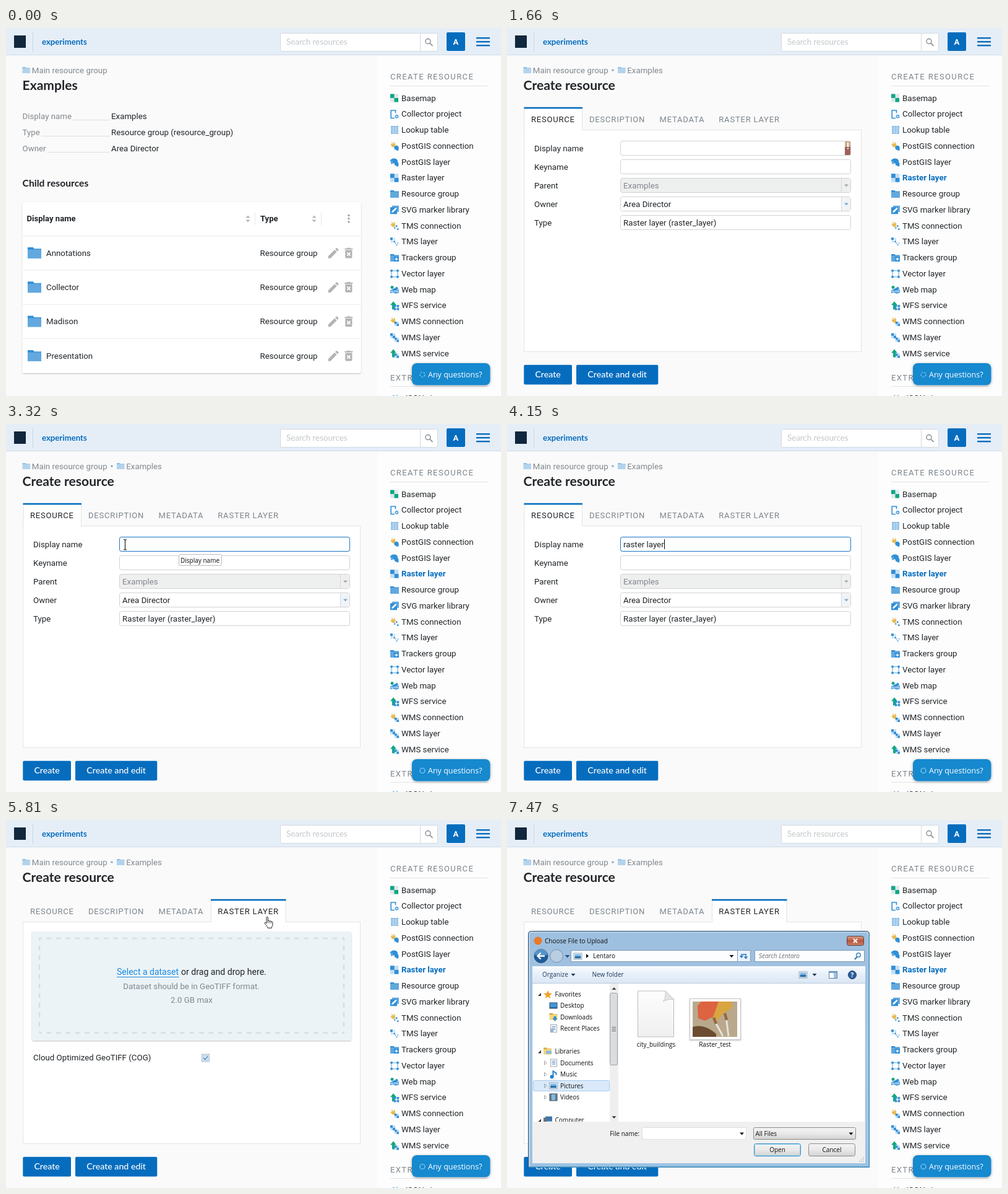
Animation, 800 px wide and 594 px high, one loop 8000 ms. Source, as an HTML page:

```html
<!DOCTYPE html>
<html lang="en">
<head>
<meta charset="utf-8">
<title>Create a raster layer</title>
<style>
html, body { margin: 0; width: 100%; height: 100%; overflow: hidden; background: #fafafa; }
svg { display: block; width: 100%; height: 100%; }
text { font: 13.3px Roboto, sans-serif; fill: #212529; white-space: pre; }
.gray { fill: #82888e; }
.bold { font-weight: 700; font-size: 13.1px; }
.lato { font-family: Lato, sans-serif; }
.h1 { font: 700 21.1px Lato, sans-serif; }
.h2 { font: 700 15.7px Lato, sans-serif; }
.caps { font-size: 13px; letter-spacing: 1.4px; fill: #7d858c; }
.tab { font-size: 13.1px; letter-spacing: .75px; fill: #7d858c; }
.tab.on { fill: #212529; }
.btn { font: 500 14.2px Lato, sans-serif; fill: #fff; }
.ui { font: 10px "Open Sans", sans-serif; fill: #111; }
.chat { font: 12.5px "Open Sans", sans-serif; fill: #fff; }
.mid { text-anchor: middle; }
</style>
</head>
<body>
<svg id="stage" viewBox="0 0 800 594" preserveAspectRatio="none" xmlns="http://www.w3.org/2000/svg"></svg>
<script>
const BLUE = '#066dbe', SKY = '#62a8de', MID = '#2f8fd8', PALE = '#c3def4', GREEN = '#12a683', YELLOW = '#e6bb55';

const T = (x, y, s, cls = '', more = '') => `<text x="${x}" y="${y}" class="${cls}" ${more}>${s}</text>`;
const R = (x, y, w, h, fill, more = '') => `<rect x="${x}" y="${y}" width="${w}" height="${h}" fill="${fill}" ${more}/>`;
const P = (d, fill, more = '') => `<path d="${d}" fill="${fill}" ${more}/>`;
const L = (d, color, w = 1, more = '') => P(d, 'none', `stroke="${color}" stroke-width="${w}" ${more}`);
const C = (x, y, r, fill, more = '') => `<circle cx="${x}" cy="${y}" r="${r}" fill="${fill}" ${more}/>`;
const G = (x, y, s, more = '') => `<g transform="translate(${x} ${y})" ${more}>${s}</g>`;
const box = (x, y, w, h, fill, stroke, r = 0) => R(x + .5, y + .5, w - 1, h - 1, fill, `rx="${r}" stroke="${stroke}"`);
const show = (id, s) => `<g id="${id}">${s}</g>`;

// ---- small icons, drawn in a 14 px square ----
const folder = (w, h, back, front) =>
  P(`M0 0H${w * .4}L${w * .48} ${h * .13}H${w}V${h * .3}H0Z`, back) + R(0, h * .2, w, h * .8, front);
const checker = (s, a, b) => R(0, 0, 2 * s, 2 * s, b) + R(0, 0, s, s, a) + R(s, s, s, s, a);
const plug = L('M2.5 .5L4 4M6.5 .5L6 3.5M5 7L7.5 10', YELLOW, 1.3) + P('M.5 4L8 2.5L8.3 5.5Q7.5 8.5 5 8.5Q2 8.5 .5 4Z', YELLOW);
const arrow = P('M0 6L5 0L10 6H7V13H3V6Z', GREEN);
const dots = R(9, 6, 2.5, 2.5, MID) + R(6, 9, 2.5, 2.5, SKY) + R(11, 11, 2.5, 2.5, MID);
const blob = (x, y, r) => C(x, y, r, MID) + R(x, y, r, r + 1, MID);
const small = G(7, 7, checker(3.5, MID, PALE));
const nodes = (a, b) => L(`M${a} ${a}H${b}V${b}H${a}Z`, SKY) +
  [[a, a], [b, a], [a, b], [b, b]].map(p => R(p[0] - 1.7, p[1] - 1.7, 3.4, 3.4, MID)).join('');
const dir = folder(14, 12, MID, SKY);

const items = [
  ['Basemap', checker(6.5, GREEN, '#dce9ee')],
  ['Collector project', L('M8.5 5V.8H1.2V13.2H7', MID, 1.6) + C(10.5, 10.5, 3, SKY) + C(10.5, 10.5, 1, '#fff')],
  ['Lookup table', R(1, 0, 12, 13, '#8bbde6') + L('M1 3.5H13M1 6.7H13M1 10H13M5 0V13M9 0V13', '#d6e8f6', .8)],
  ['PostGIS connection', plug + blob(10, 9.5, 3.5)],
  ['PostGIS layer', `<ellipse cx="6" cy="5" rx="6" ry="4" fill="${MID}"/>` + R(1, 5, 3, 5, SKY) + blob(10, 9.5, 3.3)],
  ['Raster layer', checker(6.7, MID, PALE)],
  ['Resource group', G(0, 1, dir)],
  ['SVG marker library', R(3, 0, 11, 10, SKY) + R(0, 2.5, 11, 11, MID) + P('M2 11.5L3 8.5L9 3L10.5 5L5 10.5Z', '#fff')],
  ['TMS connection', plug + dots],
  ['TMS layer', R(0, 0, 4, 4, MID) + R(5, 1, 3, 3, PALE) + R(1, 5, 3, 3, PALE) + R(5, 5, 3, 3, SKY) + P('M7 8H14L10.5 14Z', '#8bbde6') + C(10.5, 9.5, 1.5, '#fff')],
  ['Trackers group', G(0, 1, dir) + R(6, 5, 8, 8, MID) + L('M10 6.5V11.5M7.5 9H12.5', '#fff', 1.3)],
  ['Vector layer', nodes(2, 12)],
  ['Web map', P('M0 8L4 6L9 8L14 6V12L9 13.5L4 11.5L0 13Z', SKY) + P('M3 7L11 2L13 5L6 11Z', MID) + C(3, 3, 2.5, GREEN) + L('M1 10L8 9L13 10', '#e8f2fb')],
  ['WFS service', arrow + G(6, 6, nodes(1.5, 6.5))],
  ['WMS connection', plug + small],
  ['WMS layer', checker(4, MID, PALE) + small],
  ['WMS service', arrow + small]
];

// ---- page frame ----
function header() {
  return R(0, 0, 800, 43, '#e5eef7') + R(0, 43, 800, 1, '#cfdbe7') +
    R(13, 12, 19, 20, '#10273d') + R(43, 7, 1, 31, '#c6d6e5') +
    T(58, 26.5, 'experiments', 'lato', `style="font-weight:700;font-size:13.2px;fill:${BLUE}"`) +
    box(443, 8, 255, 30, '#fff', '#d3d9df', 2) + R(669, 9, 1, 28, '#d3d9df') +
    T(453, 26.5, 'Search resources', 'lato', 'style="fill:#c3c7cb"') +
    C(682, 21.5, 4, 'none', 'stroke="#858b90" stroke-width="1.4"') + L('M685 24.5L689.5 29', '#858b90', 1.7) +
    R(712, 7, 30, 30, BLUE, 'rx="2"') + T(727, 26.7, 'A', 'bold mid', 'style="fill:#fff"') +
    [15, 21, 27].map(y => R(760, y, 22, 2.4, BLUE)).join('');
}

function sidebar() {
  const rows = items.map(([name, icon], i) => {
    const y = 113 + 25.75 * i;
    return G(621, y - 6.5, icon) + T(639, y + 4.6, name, '', i === 5 ? 'id="pick"' : '');
  }).join('');
  return R(600, 44, 200, 550, '#fdfdfd') + T(621, 83, 'CREATE RESOURCE', 'caps') + R(621, 93, 158, 1, '#e3e3e3') +
    rows + T(621, 569, 'EXTRA', 'caps') + R(621, 578, 158, 1, '#e3e3e3') +
    T(642, 602, 'JSON view') + T(623, 602, '{ }', '', `style="fill:${MID}"`) +
    show('bar', R(600, 229, 3, 26, BLUE));
}

const chat = () => R(656, 541, 126.5, 35.5, '#1489cf', 'rx="8" filter="url(#soft)"') +
  C(673, 559.5, 4, 'none', 'id="ring" stroke="#8fd0f5" stroke-width="1.2"') +
  T(682, 564, 'Any questions?', 'chat');

const crumb = (x, s) => G(x, 63, folder(12.5, 10, '#8fc0e6', '#b3d3ed')) + T(x + 15.3, 72.5, s, 'gray');

// ---- resource list ----
const PEN = 'M3 17.25V21h3.75L17.81 9.94l-3.75-3.75zM20.71 7.04c.39-.39.39-1.02 0-1.41l-2.34-2.34c-.39-.39-1.02-.39-1.41 0l-1.83 1.83 3.75 3.75z';
const BIN = 'M6 19c0 1.1.9 2 2 2h8c1.1 0 2-.9 2-2V7H6zm2.46-7.12l1.41-1.41L12 12.59l2.12-2.12 1.41 1.41L13.41 14l2.12 2.12-1.41 1.41L12 15.41l-2.12 2.12-1.41-1.41L10.59 14zM15.5 4l-1-1h-5l-1 1H5v2h14V4z';
const sorter = x => P(`M${x - 3.5} 306.5L${x} 302.5L${x + 3.5} 306.5ZM${x - 3.5} 309.5L${x} 313.5L${x + 3.5} 309.5Z`, '#b4b7ba');

function list() {
  const info = [['Display name', 'Examples', 108], ['Type', 'Resource group (resource_group)', 57], ['Owner', 'Area Director', 67]];
  const rows = ['Annotations', 'Collector', 'Madison', 'Presentation'].map((s, i) => {
    const y = 363 + 55.3 * i;
    return R(27, Math.round(y - 28), 546, 1, '#ececec') + G(35, y - 9, folder(22, 18, MID, SKY)) +
      T(65, y + 4.7, s) + T(410.5, y + 4.7, 'Resource group') +
      P(PEN, '#b3b3b3', `transform="translate(518 ${y - 10.8}) scale(.93)"`) +
      P(BIN, '#b3b3b3', `transform="translate(542.7 ${y - 11}) scale(.93)"`);
  }).join('');
  return crumb(26.5, 'Main resource group') + T(26.5, 99.8, 'Examples', 'h1') +
    info.map(([k, v, x], i) => T(26.5, 147.2 + 25.7 * i, k, 'gray') + R(x, 148 + 26 * i, 168 - x, 1, '#dedede') +
      T(170, 147.2 + 25.7 * i, v)).join('') +
    T(26.5, 255.5, 'Child resources', 'h2') +
    R(26.5, 281, 547, 276, '#fff', 'rx="2" filter="url(#card)"') +
    T(33.5, 312.3, 'Display name', 'bold') + T(411, 312.3, 'Type', 'bold') + sorter(391) + sorter(498) +
    R(402, 298, 1, 20, '#e6e6e6') + R(509, 298, 1, 20, '#e6e6e6') +
    [302.5, 307.8, 313].map(y => C(554, y, 1.8, '#aaa')).join('') + rows;
}

// ---- create form ----
const tabs = on => [['RESOURCE', 39, 28, 93.5], ['DESCRIPTION', 133], ['METADATA', 246.5], ['RASTER LAYER', 342.3, 331.5, 120.5]]
  .map(([s, x, left, w], i) => (i === on
    ? R(left, 128, w, 38, '#fff') + L(`M${left} 165V128M${left + w} 165V128`, '#e2e2e2') + R(left - .5, 127.7, w + 1, 2.6, BLUE) : '') +
    T(x, 152.4, s, i === on ? 'tab on' : 'tab', i === 3 && on === 0 ? 'id="rasterTab"' : '')).join('');

const button = (x, w, s) => R(x, 543.7, w, 31.8, BLUE, 'rx="2"') + T(x + w / 2, 564.2, s, 'btn mid');

const base = () => crumb(26.5, 'Main resource group') + C(171, 68, 1.8, '#7fb2dc') + crumb(179, 'Examples') +
  T(26.5, 99.8, 'Create resource', 'h1') + box(27, 164, 546, 359, '#fff', '#e4e4e4') +
  button(27.3, 77.7, 'Create') + button(112, 132.3, 'Create and edit');

function fields() {
  const rows = [['Display name', ''], ['Keyname', ''], ['Parent', 'Examples'], ['Owner', 'Area Director'], ['Type', 'Raster layer (raster_layer)']];
  return tabs(0) + rows.map(([k, v], i) => {
    const y = 182 + 30 * i, off = i === 2;
    return T(44, y + 16.6, k) + box(183, y, 373, 24, off ? '#eeefef' : '#fff', '#d2d2d2', 3) +
      T(188, y + 16.6, v, off ? 'gray' : '') +
      (i === 2 || i === 3 ? R(540, y + 1, 15, 22, off ? '#efefef' : '#f0f4f8') + R(540, y + 1, 1, 22, '#d6d9dc') +
        P(`M545 ${y + 10.5}h7l-3.5 4z`, off ? '#aaa' : '#86a9c8') : '');
  }).join('') +
    show('warn', R(546, 183, 9, 22, '#a0605f') + R(546, 183, 9, 9, '#c9b08c') + R(550, 185, 2, 7, '#fff') + R(550, 193.5, 2, 2, '#fff')) +
    show('focus', box(183, 182, 373, 24, 'none', '#1a76c4', 3)) +
    T(188, 198.6, '', '', 'id="typed"') + R(280, 186, 1, 16, '#000', 'id="caret"');
}

const drop = () => tabs(3) + R(42, 180, 516, 176, '#ebf3f7', 'rx="3" filter="url(#card)"') +
  L('M54 191H546.8M54 343.5H546.8M54 191V343.5M546 191V343.5', '#d9dddf', 2.6, 'stroke-dasharray="7.7" stroke-dashoffset="3.85"') +
  T(179, 249.5, 'Select a dataset', '', 'style="font-size:14px;fill:#1c8be0"') + R(179, 253, 100.5, 1, '#1c8be0') +
  T(283, 249.5, 'or drag and drop here.', '', 'style="font-size:14.1px"') +
  T(299.5, 272.5, 'Dataset should be in GeoTIFF format.', 'gray mid') + T(300, 294.5, '2.0 GB max', 'gray mid') +
  T(44, 388, 'Cloud Optimized GeoTIFF (COG)') +
  box(316, 377.5, 13, 13, '#eaf2fa', '#a9bccd') + box(318, 379.5, 9, 9, '#d5e6f5', '#a8c6e2') + L('M319.5 384L321.8 386.5L325.8 381.3', '#4a86bf', 1.3);

// ---- file dialog ----
function dialog() {
  const pic = R(0, 1, 13, 10, '#fff', 'stroke="#7890a8" stroke-width=".8"') + R(1.5, 2.5, 10, 4, '#79b9e8') + R(1.5, 6, 10, 3.5, '#2d6da5');
  const page = R(2, 0, 10, 12, '#fff', 'stroke="#8795a5" stroke-width=".8"') + L('M4 3H10M4 5.5H10M4 8H10', '#4d82b8');
  const yellow = folder(13, 11, '#d3a437', '#f3d77e');
  const tree = [
    [281, 0, 'Favorites', P('M7 0L9 4.5L14 5L10 8.2L11.3 13L7 10.3L2.7 13L4 8.2L0 5L5 4.5Z', '#f0a02c')],
    [299.5, 1, 'Desktop', R(0, 1, 13, 10, '#24507e') + R(1, 2, 11, 7, '#4795d5')],
    [318, 1, 'Downloads', yellow + P('M7 5H11V8H13L9 13L5 8H7Z', MID)],
    [336.5, 1, 'Recent Places', page + C(4, 9, 3, '#9ab7d0')],
    [373.5, 0, 'Libraries', yellow + R(4, 5, 9, 5, '#88b9df')],
    [392, 2, 'Documents', page],
    [410.5, 2, 'Music', L('M6 10V1L11 4V7', '#1b80cd', 2) + C(4, 10, 3, '#1b80cd')],
    [429, 2, 'Pictures', pic],
    [447.5, 2, 'Videos', R(0, 0, 13, 12, '#35424f') + R(3, 1, 7, 10, '#83b9df') + L('M1.5 0V12M11.5 0V12', '#fff', 1, 'stroke-dasharray="1 1"')],
    [484.5, 0, 'Computer', R(3, 0, 11, 8, '#3d76aa') + R(0, 2, 5, 9, '#66737f')]
  ].map(([y, kind, s, icon]) => {
    const mark = kind === 0 ? P(`M50 ${y + 3}h5v-5z`, '#333') : kind === 2 ? L(`M60.5 ${y - 3}v6l3.5-3z`, '#999', .9) : '';
    return (s === 'Pictures' ? box(42, y - 9, 124, 18, '#d9e9f9', '#a9cbec', 2) : '') + mark +
      G(kind ? 68.5 : 59, y - 6, icon) + T(kind ? 86 : 77.5, y + 3.6, s, 'ui');
  }).join('');
  const push = (x, w, s, edge) => box(x, 522, w, 21, 'url(#gray)', edge, 3) + T(x + w / 2, 536, s, 'ui mid');
  const photo = R(300, 293, 72, 57, '#b9a88c') + P('M308 300L314 293H342L337 316L320 324L309 320Z', '#dc6440') +
    P('M342 293H362L364 303L349 313L336 327L333 318Z', '#d8a540') + P('M300 334Q318 328 338 345V350H300Z', '#6b4c31') +
    L('M337 327L349 349M354 318L358 349', '#e4e2da', 3) + L('M334 319L338 329M352 312L355 323', '#94683f', 4.5);
  const frame = 'M34.5 560.5V184.5Q34.5 179.5 39.5 179.5H580.5Q585.5 179.5 585.5 184.5V560.5Z';
  return P(frame, 'url(#aero)', 'stroke="#2a4a66"') +
    L('M36 559V185Q36 181 40 181H580Q584 181 584 185V559', '#dcecf8', 1, 'opacity=".8"') + L('M35 560H585V186', '#4b9dcd', 1.5) +
    C(50, 195, 6.5, '#e8792b') + T(61, 198.8, 'Choose File to Upload', 'ui') +
    box(549, 187, 28, 16, 'url(#red)', '#5b4040', 3) + L('M560 192L566 198M566 192L560 198', '#fff', 2) +
    C(55, 219.5, 11, '#1e5d9d', 'stroke="#264668"') + P('M44.5 218A10.5 10.5 0 0 1 65.5 218Z', '#6da9d8', 'opacity=".7"') +
    L('M61 219.5H50M54.5 214.5L49.5 219.5L54.5 224.5', '#fff', 2.4) +
    C(80, 219.5, 10.3, '#b9cee2', 'stroke="#7891aa"') + P('M93.5 218h8l-4 4.5z', '#24558a') +
    box(103, 210, 270, 19, '#fcfdff', '#7f9db9') + G(108, 214, pic) + P('M128 216v7l4-3.5z', '#111') +
    T(139, 223, 'Lentaro', 'ui') + P('M359.5 218h7l-3.5 4z', '#111') +
    box(372, 210, 22, 19, '#eaf3fb', '#7f9db9') +
    L('M387 217H379V221M376.5 219L379 222L381.5 219M386 216V223M383.5 220.5L386 223.5L388.5 220.5', '#2a76c2', 1.4) +
    box(400, 210, 178, 19, '#fcfdff', '#7f9db9') + T(407, 223, 'Search Lentaro', 'ui', 'style="font-style:italic;fill:#707070"') +
    C(568, 218, 3.3, '#dcefff', 'stroke="#3d77b0" stroke-width="1.3"') + L('M565.5 221L562 225', '#3d77b0', 2) +
    R(41, 236, 538, 318, '#f0f0f0') + R(41, 236, 538, 28, 'url(#tool)') + R(41, 263, 538, 1, '#b9cade') +
    T(57, 253.3, 'Organize', 'ui', 'style="fill:#1e395b"') + P('M103.5 248h7l-3.5 4z', '#1e395b') +
    T(137.5, 253.3, 'New folder', 'ui', 'style="fill:#1e395b"') +
    G(472, 244, pic) + P('M493.5 248h7l-3.5 4z', '#1e395b') +
    box(520, 244, 14, 12, '#fff', '#5b7ea3') + R(521, 245, 12, 2, '#82abd2') + R(528, 247, 5, 8, '#9cc5e8') +
    C(558, 250, 6.5, '#2d5f9c', 'stroke="#193f70"') + T(558, 253.7, '?', 'ui mid', 'style="fill:#fff;font-weight:700"') +
    R(42, 264, 536, 223, '#fff') + `<g clip-path="url(#pane)">${tree}</g>` +
    R(166, 264, 14, 223, '#efefef') + box(166, 279, 13, 117, '#dadcde', '#a0a2a5', 2) +
    L('M169.5 334.5H176M169.5 337.5H176M169.5 340.5H176', '#666') + P('M169.5 274h7l-3.5-4zM169.5 478h7l-3.5 4z', '#444') +
    P('M211.5 276H256L269.5 290V350H211.5Z', 'url(#sheet)', 'stroke="#bcbcbc"') + P('M256 276Q257 288 252 293Q262 288 269.5 290Z', '#e4e4e4', 'stroke="#bbb" stroke-width=".7"') +
    R(295.5, 288.5, 82, 66, '#fff', 'stroke="#c4c4c4" filter="url(#card)"') + photo +
    T(241, 366, 'city_buildings', 'ui mid') + T(336, 366, 'Raster_test', 'ui mid') +
    T(214, 509.5, 'File name:', 'ui', 'text-anchor="end"') + box(218, 496, 169, 20, '#fff', '#dcdfe3') + P('M376 504.5h7l-3.5 4z', '#111') +
    box(398, 496, 166, 20, 'url(#gray)', '#8c8c8c', 2) + T(401.5, 509.5, 'All Files', 'ui') + P('M552.5 504.5h7l-3.5 4z', '#111') +
    push(399, 76, 'Open', '#3c8ec4') + R(400.5, 523.5, 73, 18, 'none', 'rx="2" stroke="#8fd3f3"') + push(487, 76, 'Cancel', '#8c8c8c') +
    [[575, 550], [575, 547], [572, 550], [575, 544], [572, 547], [569, 550]].map(p => R(p[0], p[1], 1.5, 1.5, '#b5b5b5')).join('');
}

// ---- pointers and tips ----
const hand = P('M3 1.3C3-.1 5.3-.1 5.3 1.3V7.2C5.4 6 7.8 6.1 7.9 7.5C8.2 6.5 10.3 6.7 10.4 8C10.7 7.3 12.9 7.5 12.9 9.2V13C12.9 15 11.4 16 11.3 18.3H5.1C4.8 16 1.6 13.2.4 11.2C-.5 9.7 1 8.7 2 9.7L3 11Z', '#fff', 'stroke="#222" stroke-linejoin="round"') +
  L('M5.3 7.2V10.5M7.9 7.5V10.5M10.4 8V10.8', '#222', .8);
const pointer = P('M0 0V14L3.2 11L5.6 16.5L8 15.5L5.6 10.3H10Z', '#fff', 'stroke="#222"');
const beam = L('M-2.5 -8Q0 -8 0 -7Q0 -8 2.5 -8M0 -7.5V8M-2.5 8.5Q0 8.5 0 7.5Q0 8.5 2.5 8.5', '#222', 1.2);
const tip = (x, y, w, s) => box(x, y, w, 19, '#fbfbfd', '#bdbdc0', 2) + T(x + 3, y + 13.5, s, 'ui');

const grad = (id, ...c) => `<linearGradient id="${id}" x2="0" y2="1">${c.map((k, i) => `<stop offset="${i / (c.length - 1)}" stop-color="${k}"/>`).join('')}</linearGradient>`;
const shade = (id, dy, blur, a) => `<filter id="${id}" x="-10%" y="-30%" width="120%" height="170%"><feDropShadow dx="0" dy="${dy}" stdDeviation="${blur}" flood-opacity="${a}"/></filter>`;

const $ = id => document.getElementById(id);
$('stage').innerHTML = '<defs>' + grad('aero', '#9dbfdf', '#a6c6e3', '#9cc2e3') + grad('red', '#d9a08c', '#b9553c', '#c98266') +
  grad('tool', '#fafcfe', '#e6eff9', '#dbe6f3') + grad('gray', '#f4f4f4', '#e9e9e9', '#d2d2d2') + grad('sheet', '#fdfdfd', '#efefef') +
  shade('card', 1, 1.2, .25) + shade('soft', 1, 2, .35) +
  '<clipPath id="pane"><rect x="42" y="264" width="124" height="223"/></clipPath></defs>' +
  R(0, 0, 800, 594, '#fafafa') + header() + sidebar() +
  show('list', list()) + show('base', base()) + show('fields', fields()) + show('drop', drop()) + chat() +
  show('status', box(-1, 576, 322, 20, '#f9f9fa', '#c9c9c9', 2) + T(3, 589.5, 'https://experiments.lentaro.com/resource/2/create?cls=raster_layer', 'ui')) +
  show('nameTip', tip(279, 210, 70, 'Display name')) + show('fileTip', tip(258, 262, 81, 'No file selected.')) +
  show('dialog', dialog()) + show('hand', hand) + show('beam', beam) + show('pointer', G(246, 254.5, pointer));

const STEP = 830, LOOP = 8000, WORDS = 'raster layer test';
const on = (id, yes) => { $(id).style.display = yes ? '' : 'none'; };
const move = (id, x, y) => $(id).setAttribute('transform', `translate(${x} ${y})`);
let last = -1;

function draw(ms) {
  const n = Math.floor(ms % LOOP / STEP);
  if (n === last) return;
  last = n;
  on('list', n < 2);
  on('base', n > 1);
  on('fields', n > 1 && n < 7);
  on('drop', n > 6);
  on('bar', n === 1);
  on('status', n === 1);
  on('warn', n === 2 || n === 3);
  on('focus', n > 3);
  on('nameTip', n === 4);
  on('fileTip', n === 8);
  on('dialog', n === 9);
  on('hand', n === 1 || n === 6 || n === 7);
  on('beam', n === 3 || n === 4);
  on('pointer', n === 8);
  move('hand', n === 1 ? 706 : 418, n === 1 ? 245 : 156);
  move('beam', n === 3 ? 270 : 192.5, 194.5);
  $('pick').style.cssText = n ? `fill:${BLUE};font-weight:${n > 1 ? 700 : 400}` : '';
  $('rasterTab').style.fill = n === 6 ? '#212529' : '';
  $('ring').setAttribute('stroke-dasharray', n === 0 || n === 2 ? '3 2' : 'none');
  const text = n === 5 ? WORDS.slice(0, 12) : n > 5 ? WORDS : '';
  $('typed').textContent = text;
  on('caret', text);
  if (text && n < 7) $('caret').setAttribute('x', Math.round(188 + $('typed').getComputedTextLength()));
}

const start = performance.now();
function tick() {
  draw(performance.now() - start);
  requestAnimationFrame(tick);
}
tick();
</script>
</body>
</html>
```
